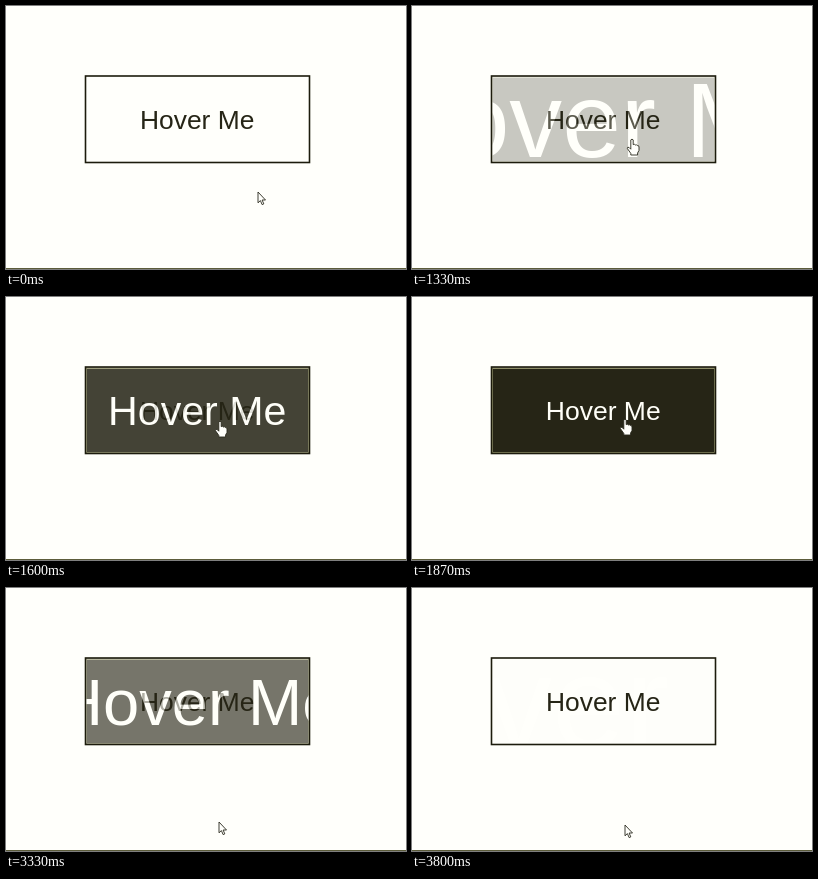
Animation, 400 px wide and 263 px high, one loop 3.99 s. Source, as an HTML page:

```html
<!DOCTYPE html>
<html>
<head>
<meta charset="utf-8">
<style>
  html, body { margin: 0; width: 100%; height: 100%; overflow: hidden; background: #fffffb; }
  svg { display: block; }
  text { font: 26.4px "Liberation Sans", Arial, sans-serif; text-anchor: middle; }
</style>
</head>
<body>
<svg width="400" height="263" viewBox="0 0 400 263">
  <clipPath id="inside"><rect x="80" y="70.5" width="223" height="85.5"/></clipPath>
  <rect y="262" width="400" height="1" fill="#5c5c3a"/>
  <text x="191.2" y="122.7" fill="#262516">Hover Me</text>
  <g id="cover" clip-path="url(#inside)">
    <rect x="80" y="70" width="224" height="87" fill="#262516"/>
    <rect x="80.5" y="71.5" width="222" height="84" fill="none" stroke="#8e8e68"/>
    <text id="big" y="9.4" fill="#fffff8">Hover Me</text>
  </g>
  <rect x="79.5" y="70" width="224" height="86.5" fill="none" stroke="#1c1b0c" stroke-width="1.6"/>
  <g fill="#fffffb" stroke="#2a2a1e" stroke-width=".9" stroke-linejoin="round">
    <path id="arrow" d="M0 0V10.8L2.4 8.6L4.1 12.6L5.8 11.9L4.1 8H7.5Z"/>
    <path id="hand" d="M-1.2 .9Q0 -.6 1.2 .9V5.6Q2.6 4.8 3.4 6Q4.8 5.3 5.4 6.6Q7 6.2 7 8V11.4L5.6 14V16H-1.2V14.4L-4.6 9.6Q-5 7.8 -3 8.4L-1.2 10.2Z"/>
  </g>
</svg>
<script>
const LOOP = 3990, ENTER = 1205, LEAVE = 3169, DURATION = 700;
const $ = id => document.getElementById(id);

// pointer path: time, x, y
const path = [
  [0, 252, 186], [1150, 252, 186], [ENTER, 238, 157], [1330, 220, 133],
  [1600, 214, 124], [1730, 213, 122], [3040, 213, 122], [LEAVE, 213, 157],
  [3330, 213, 234], [3500, 213, 237], [LOOP, 213, 237]
];

const bezier = (a, b, u) => 3 * a * u * (1 - u) ** 2 + 3 * b * u * u * (1 - u) + u ** 3;

// CSS "ease"
function ease(x) {
  if (x <= 0) return 0;
  if (x >= 1) return 1;
  let lo = 0, hi = 1;
  for (let i = 0; i < 24; i++) {
    const mid = (lo + hi) / 2;
    if (bezier(.25, .25, mid) < x) lo = mid; else hi = mid;
  }
  return bezier(.1, 1, lo);
}

function pointer(t) {
  const i = path.findIndex(p => p[0] > t);
  const [t0, x0, y0] = path[i - 1], [t1, x1, y1] = path[i];
  const k = (t - t0) / (t1 - t0);
  return [x0 + (x1 - x0) * k, y0 + (y1 - y0) * k].map(Math.round);
}

function draw(now) {
  const t = now % LOOP;
  const p = ease((t - ENTER) / DURATION) - ease((t - LEAVE) / DURATION);
  $("cover").setAttribute("opacity", p);
  $("big").setAttribute("transform", `translate(191.2 113.3) scale(${5 - 4 * p})`);

  const over = t >= ENTER && t < LEAVE;
  const at = `translate(${pointer(t)})`;
  for (const [id, shown] of [["hand", over], ["arrow", !over]]) {
    $(id).setAttribute("transform", at);
    $(id).setAttribute("visibility", shown ? "visible" : "hidden");
  }
}

const start = performance.now();
function tick() {
  draw(performance.now() - start);
  requestAnimationFrame(tick);
}
tick();
</script>
</body>
</html>
```
